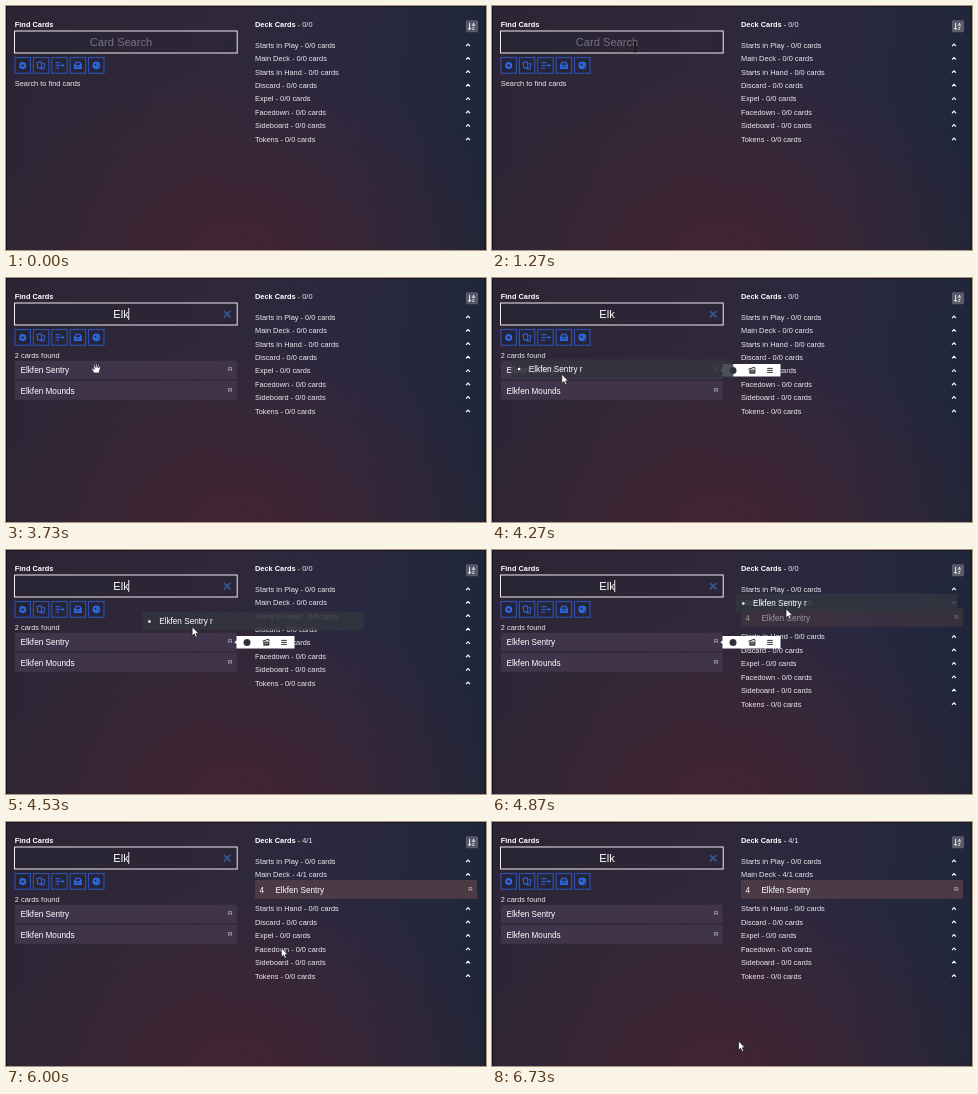
These frames come from a looping animation (480 by 244 pixels, 7.07 s). An HTML page:

```html
<!DOCTYPE html>
<html lang="en">
<head>
<meta charset="utf-8">
<title>Deck builder</title>
<style>
  html, body { margin: 0; width: 100%; height: 100%; overflow: hidden; background: #2b2636; }
  svg {
    display: block; width: 100%; height: 100%;
    font: 7.4px "Liberation Sans", Arial, sans-serif;
    background:
      radial-gradient(ellipse 58% 75% at 50% 100%, rgba(76, 34, 44, .68), transparent),
      linear-gradient(97deg, #2b2535, #30283a 42%, #292840 72%, #1e2639);
  }
  text { fill: #eceaf0; white-space: pre; }
  .bold { font-weight: bold; fill: #fff; }
  .big { font-size: 11.15px; text-anchor: middle; }
  .card { font-size: 8.2px; fill: #fff; }
  .rare { font-size: 6.2px; fill: #d5d0dc; }
  .line { fill: none; stroke: currentColor; }
  .solid { fill: currentColor; }
</style>
</head>
<body>
<svg viewBox="0 0 480 244">
  <defs>
    <g id="plus"><circle r="3.5" class="solid"/><path d="M-1.8 0H1.8M0-1.8V1.8" stroke="#252638"/></g>
    <g id="copies" class="line"><rect x="-3.6" y="-3.8" width="4.2" height="6" rx=".6" transform="rotate(-10)"/><path d="M1.5-2.2L3.8-1.5 2.6 4-1 3.2"/></g>
    <g id="addList" class="line"><path d="M-4-2.7H1M-4 0H1M-4 2.7H-.5M1.6 0H5M3.3-1.7V1.7"/></g>
    <g id="box"><path class="solid" d="M-2.5-3.7H2.5L4-.2V3.5H-4V-.2Z"/><path d="M-1.7-2.2H1.7V-.6H-1.7ZM-2.5 1.5H2.5" fill="#252638" stroke="#252638" stroke-width=".7"/></g>
    <g id="globe"><circle r="3.8" class="solid"/><path d="M-2.3-.8L0-2.4.3-.8-1 .6ZM1 .8L2.6 0 1.8 2Z" fill="#252638"/></g>
    <g id="lines" class="line"><path d="M-2.8-2H2.8M-2.8 0H2.8M-2.8 2H2.8"/></g>
    <g id="hand-cards"><path class="line" d="M-3.5-1.2L2.5-3.2 3.3-1.2"/><rect x="-2.7" y="-.8" width="6" height="4" class="solid"/><path d="M-1.5 .8H2" stroke="#fff" stroke-width=".6"/></g>
  </defs>

  <path d="M.5 0V244M479 0V244M0 .3H480" stroke="#11131d" stroke-width="1"/>
  <text class="bold" x="8.8" y="20.7">Find Cards</text>
  <rect x="8.5" y="25" width="222.7" height="22" fill="#20202f" fill-opacity=".25" stroke="#eeecf2"/>
  <text id="query" class="big" x="115" y="39.6"></text>
  <path id="caret" d="M0 30V42" stroke="#fff" stroke-width=".9"/>
  <path id="clear" d="M218 33L224.3 39.3M224.3 33L218 39.3" stroke="#315a9c" stroke-width="1.7"/>
  <g id="tools" color="#2f6ae6"></g>
  <text id="status" x="8.8" y="80"></text>
  <g id="results"></g>

  <text x="249" y="20.7"><tspan class="bold">Deck Cards</tspan><tspan id="total"></tspan></text>
  <rect x="460" y="14.3" width="12" height="12" rx="1.2" fill="#595b6b"/>
  <path d="M463.6 17V23.4M462.2 22L463.6 23.6 465 22" fill="none" stroke="#fff" stroke-width=".9"/>
  <text x="466" y="20" font-size="4.2" class="bold">A</text>
  <text x="466.1" y="24.2" font-size="4.2" class="bold">Z</text>
  <g id="deck"></g>
  <g id="deckCard"></g>

  <g id="popup" color="#34343c">
    <path d="M230.5 86H288.5V98.6H230.5V94L228.4 92.3 230.5 90.6Z" fill="#fff"/>
    <use href="#plus" x="241" y="92.4"/><use href="#hand-cards" x="260" y="92.4"/><use href="#lines" x="278" y="92.4"/>
  </g>
  <g id="ghost">
    <rect width="221.5" height="18.5" fill="#33353f" fill-opacity=".86"/>
    <circle cx="7.3" cy="9.8" r="1.3" fill="#fff"/>
    <text id="ghostName" class="card" x="17" y="12.6"></text>
  </g>

  <g id="cursor" stroke-linejoin="round">
    <path id="beam" d="M-1.7-4.8H-.5L0-4.3 .5-4.8H1.7M0-4.3V4.3M-1.7 4.8H-.5L0 4.3 .5 4.8H1.7" fill="none" stroke="#100e16" stroke-width=".9"/>
    <path id="arrow" d="M0 0V9.2L2.1 7.3 3.6 10.5 5.2 9.8 3.8 6.7H6.6Z" fill="#fff" stroke="#15131b" stroke-width=".7"/>
    <path id="grab" d="M-2 5L-4.3 1.2Q-4.4 0-3.1 .3L-1.9 1.7-2.6-3Q-1.9-4.2-1.2-3L-.6-.6-.5-4Q.3-5 .9-4L1-.6 1.8-3.6Q2.8-4.2 3-3L2.6 0 3.7-1.7Q4.6-1.9 4.5-.7L3 5Z" fill="#fff" stroke="#15131b" stroke-width=".6"/>
    <path id="pointer" d="M-1 0Q0-1.3 1 0V3.5L4.5 4.3Q5.4 4.7 5.1 6L4.2 9.8H-.8L-3.4 6.1Q-3.6 4.8-2.4 5L-1 6Z" fill="#fff" stroke="#15131b" stroke-width=".7"/>
  </g>
</svg>
<script>
const LOOP = 7070, STEP = 1000 / 15;
const CARDS = ["Elkfen Sentry", "Elkfen Mounds"];
const PILES = ["Starts in Play", "Main Deck", "Starts in Hand", "Discard", "Expel", "Facedown", "Sideboard", "Tokens"];
const $ = id => document.getElementById(id);
const show = (id, on) => { $(id).style.display = on ? "" : "none"; };
const write = (id, text) => { if ($(id).textContent !== text) $(id).textContent = text; };

$("tools").innerHTML = ["plus", "copies", "addList", "box", "globe"].map((icon, i) => {
  const x = 9 + 18.4 * i;
  return `<rect x="${x}" y="51.6" width="15.4" height="15.6" fill="#20243a" fill-opacity=".5" stroke="#2a58c4"/>
    <use href="#${icon}" x="${x + 7.7}" y="59.4"/>`;
}).join("");

const cardRow = (x, y, name, color, indent) =>
  `<rect x="${x}" y="${y}" width="222" height="18.8" fill="${color}"/>
   <text class="card" x="${x + indent}" y="${y + 12.6}">${name}</text>
   <text class="rare" x="${x + 213.3}" y="${y + 10.6}">R</text>`;

$("results").innerHTML = CARDS.map((name, i) => cardRow(8.8, 82.8 + 20.2 * i, name, "#40344b", 5.7)).join("");
$("deckCard").innerHTML = cardRow(249, 58, CARDS[0], "#4c3b44", 20.4) + '<text class="card" x="253.6" y="70.6">4</text>';
$("deck").innerHTML = PILES.map((_, i) =>
  `<g id="pile${i}"><text id="label${i}" x="249"></text>
   <path d="M460-1.6L462-3.7 464-1.6" fill="none" stroke="#fff" stroke-width="1.1"/></g>`).join("");
write("ghostName", CARDS[0] + " r");

// Cursor path: time, x, y
const PATH = [
  [0, 250, 256], [700, 141, 41], [800, 141, 41], [1000, 143, 41], [3130, 143, 41],
  [3670, 90, 90], [3800, 90, 90], [4120, 59, 98], [4180, 59, 98], [4850, 294, 58.6],
  [5000, 294, 60], [5260, 294, 68], [5700, 294, 68], [6400, 246.5, 215], [6720, 246.5, 219], [LOOP, 246.5, 219]
];
function cursorAt(t) {
  const i = PATH.findIndex(p => p[0] > t);
  const [t0, x0, y0] = PATH[i - 1], [t1, x1, y1] = PATH[i];
  const u = (t - t0) / (t1 - t0), e = u * u * (3 - 2 * u);
  return [x0 + (x1 - x0) * e, y0 + (y1 - y0) * e];
}

// Times at which the caret switches, starting from hidden
const BLINKS = [730, 1260, 1660, 2925, 3460, 3995, 4525, 5325, 5860, 6460];

function draw(t) {
  const typed = t < 1660 ? "" : t < 1930 ? "E" : t < 2395 ? "El" : "Elk";
  const found = t >= 3130, dragging = t >= 4260 && t < 4995, opened = t >= 4795, dropped = t >= 4995;

  write("query", typed || "Card Search");
  $("query").style.fill = typed ? "#fff" : "#77727f";
  const caretX = 115 + (typed ? $("query").getComputedTextLength() / 2 : 0);
  $("caret").setAttribute("transform", `translate(${caretX} 0)`);
  show("caret", BLINKS.filter(b => b <= t).length % 2);
  show("clear", typed);
  write("status", found ? "2 cards found" : typed ? "No Results" : "Search to find cards");
  show("results", found);

  write("total", dropped ? " - 4/1" : " - 0/0");
  PILES.forEach((name, i) => {
    write("label" + i, `${name} - ${dropped && i === 1 ? "4/1" : "0/0"} cards`);
    $("pile" + i).setAttribute("transform", `translate(0 ${41.7 + 13.43 * i + (opened && i > 1 ? 20.8 : 0)})`);
  });
  show("deckCard", opened);
  $("deckCard").style.opacity = dropped ? 1 : .5;

  show("popup", t >= 3795 && !dropped);
  $("popup").style.opacity = Math.min(1, (t - 3730) / 200);

  const [x, y] = cursorAt(t);
  show("ghost", dragging);
  $("ghost").setAttribute("transform", `translate(${x - 50} ${y - 15})`);
  $("cursor").setAttribute("transform", `translate(${x} ${y})`);
  const overInput = x < 231 && y > 25 && y < 47;
  const overResult = found && !dragging && x < 231 && y > 83 && y < 122;
  const overDeckCard = dropped && y > 58 && y < 77;
  const shape = overInput ? "beam" : overResult ? "grab" : overDeckCard ? "pointer" : "arrow";
  for (const id of ["beam", "grab", "pointer", "arrow"]) show(id, id === shape);
}

const start = performance.now();
function tick() {
  const t = (performance.now() - start) % LOOP;
  draw(Math.floor((t + 3.4) / STEP) * STEP);
  requestAnimationFrame(tick);
}
tick();
</script>
</body>
</html>
```
